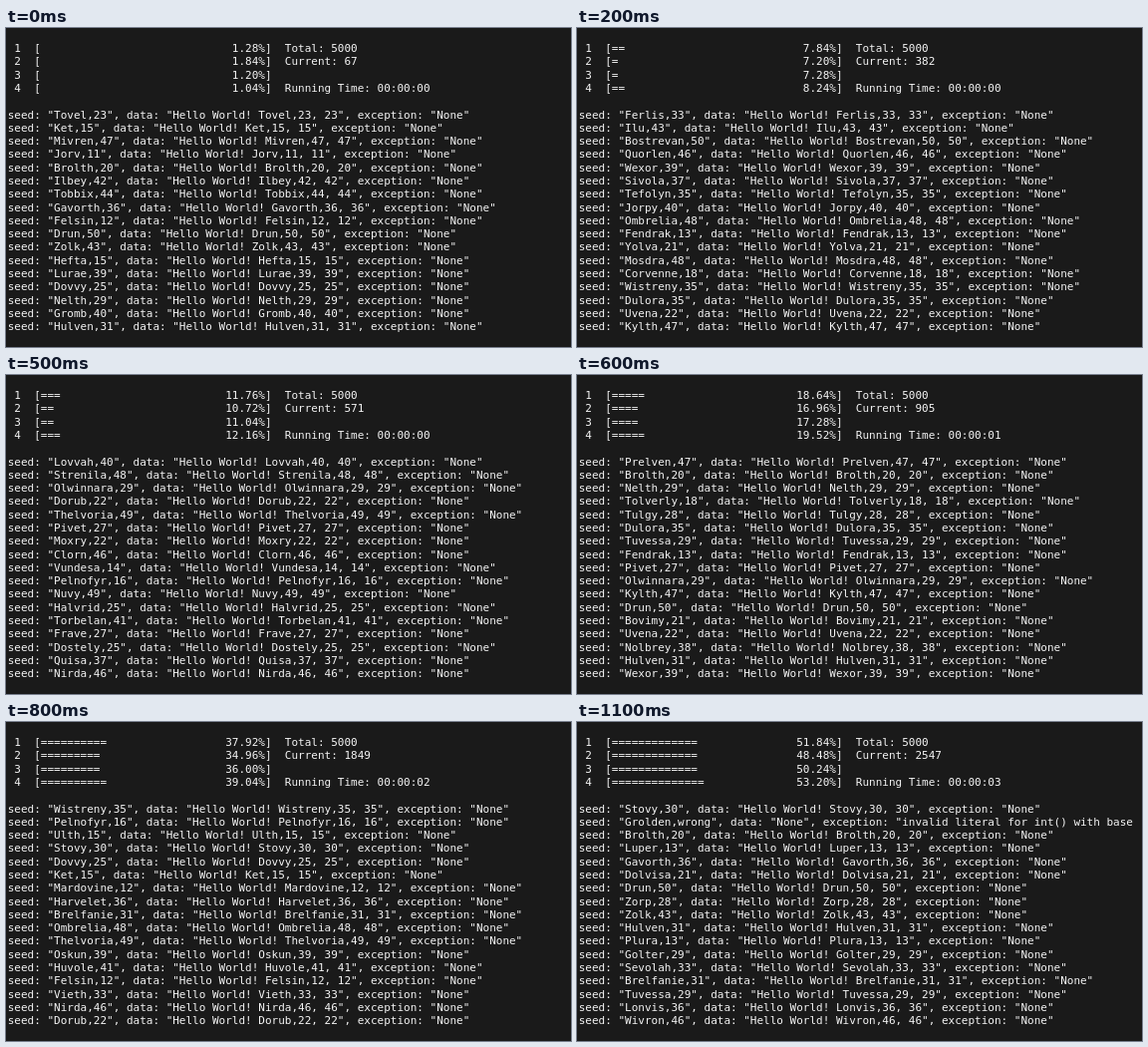
An HTML page that plays this animation: 567 by 320 pixels, repeating every 1.2 s.

```html
<!DOCTYPE html>
<html lang="en">
<head>
<meta charset="utf-8">
<title>Worker progress</title>
<style>
  html, body { margin: 0; width: 100%; height: 100%; overflow: hidden; background: #1a1a1a; }
  #term {
    position: absolute; left: 1.7px; top: 14.2px; margin: 0;
    font: 11px/13.28px "DejaVu Sans Mono", "Liberation Mono", monospace;
    font-variant-ligatures: none; white-space: pre; color: #f4f4f4;
  }
</style>
</head>
<body>
<pre id="term"></pre>
<script>
const STEP = 100, COLUMNS = 85, ROWS = 17, TOTAL = 5000;
const BAR = 27, INNER = 34;

// Per step: items done by each worker, then the visible log entries.
// Steps without entries are filled from the pool.
const steps = [
  [[16, 23, 15, 13], 'Tovel,23 Ket,15 Mivren,47 Jorv,11 Brolth,20 Ilbey,42 Tobbix,44 Gavorth,36 Felsin,12 Drun,50 Zolk,43 Hefta,15 Lurae,39 Dovvy,25 Nelth,29 Gromb,40 Hulven,31'],
  [[57, 56, 53, 58]],
  [[98, 90, 91, 103], 'Ferlis,33 Ilu,43 Bostrevan,50 Quorlen,46 Wexor,39 Sivola,37 Tefolyn,35 Jorpy,40 Ombrelia,48 Fendrak,13 Yolva,21 Mosdra,48 Corvenne,18 Wistreny,35 Dulora,35 Uvena,22 Kylth,47'],
  [[110, 103, 102, 112]],
  [[122, 116, 114, 120], 'Hoxen,15 Jolvet,43 Pruley,14 Vieth,33 Bovimy,21 Dubry,21 Haldrastove,14 Felsin,12 Ket,15 Tolverly,18 Lurae,39 Wostel,32 Fumel,38 Sarvenne,40 Ovinda,39 Grolden,wrong Nelth,29'],
  [[147, 134, 138, 152], 'Lovvah,40 Strenila,48 Olwinnara,29 Dorub,22 Thelvoria,49 Pivet,27 Moxry,22 Clorn,46 Vundesa,14 Pelnofyr,16 Nuvy,49 Halvrid,25 Torbelan,41 Frave,27 Dostely,25 Quisa,37 Nirda,46'],
  [[233, 212, 216, 244]],
  [[319, 291, 295, 335], 'Uvena,22 Ulzene,21 Sefen,32 Brius,37 Mardovine,12 Tulgy,28 Jaule,50 Fyne,46 Ulmi,48 Gorna,23 Zalverine,21 Huvole,41 Thelvoria,49 Pruley,14 Tolverly,18 Fumel,38 Oskun,39'],
  [[474, 437, 450, 488]],
  [[630, 583, 605, 640], 'Olwinnara,29 Dwel,24 Kuln,25 Fostelan,35 Ulth,15 Prelven,47 Pelnofyr,16 Nirda,46 Torvara,18 Mofan,16 Tefolyn,35 Dorub,22 Nolbrey,38 Moxry,22 Yolva,21 Dwel,24 Harvelet,36'],
  [[639, 594, 616, 653], 'Dulora,35 Hoxen,15 Wostel,32 Frave,27 Ferlis,33 Sefen,32 Strenila,wrong Jorv,11 Vieth,33 Corvenne,18 Ilbey,42 Gromb,40 Huvole,41 Kylth,47 Pivet,27 Tobbix,44 Quisa,37'],
  [[648, 606, 628, 665], 'Stovy,30 Grolden,wrong Brolth,20 Luper,13 Gavorth,36 Dolvisa,21 Drun,50 Zorp,28 Zolk,43 Hulven,31 Plura,13 Golter,29 Sevolah,33 Brelfanie,31 Tuvessa,29 Lonvis,36 Wivron,46']
];

const pool = steps.flatMap(([, names]) => names ? names.split(' ') : [])
  .filter(entry => !entry.endsWith('wrong'));

const fill = n => Array.from({ length: ROWS }, (_, r) => pool[(n * 37 + r * 29) % pool.length]);

function logLine(entry) {
  const age = entry.split(',')[1];
  const failed = age === 'wrong';
  const data = failed ? 'None' : `Hello World! ${entry}, ${age}`;
  const error = failed ? `invalid literal for int() with base 10: '${age}'` : 'None';
  return `seed: "${entry}", data: "${data}", exception: "${error}"`.slice(0, COLUMNS);
}

function header(counts) {
  const current = counts.reduce((a, b) => a + b);
  const seconds = Math.floor(current / 800);
  const notes = [`Total: ${TOTAL}`, `Current: ${current}`, '', `Running Time: 00:00:0${seconds}`];
  return counts.map((count, i) => {
    const part = count / (TOTAL / counts.length);
    const bar = '='.repeat(Math.floor(part * BAR));
    const percent = (part * 100).toFixed(2) + '%';
    return ` ${i + 1}  [${bar}${percent.padStart(INNER - bar.length)}]  ${notes[i]}`;
  });
}

const screens = steps.map(([counts, names], n) =>
  [...header(counts), '', ...(names ? names.split(' ') : fill(n)).map(logLine)].join('\n'));

const term = document.getElementById('term');
const start = performance.now();
let shown = -1;

function draw() {
  const n = Math.floor((performance.now() - start) / STEP) % screens.length;
  if (n !== shown) term.textContent = screens[shown = n];
  requestAnimationFrame(draw);
}
draw();
</script>
</body>
</html>
```
